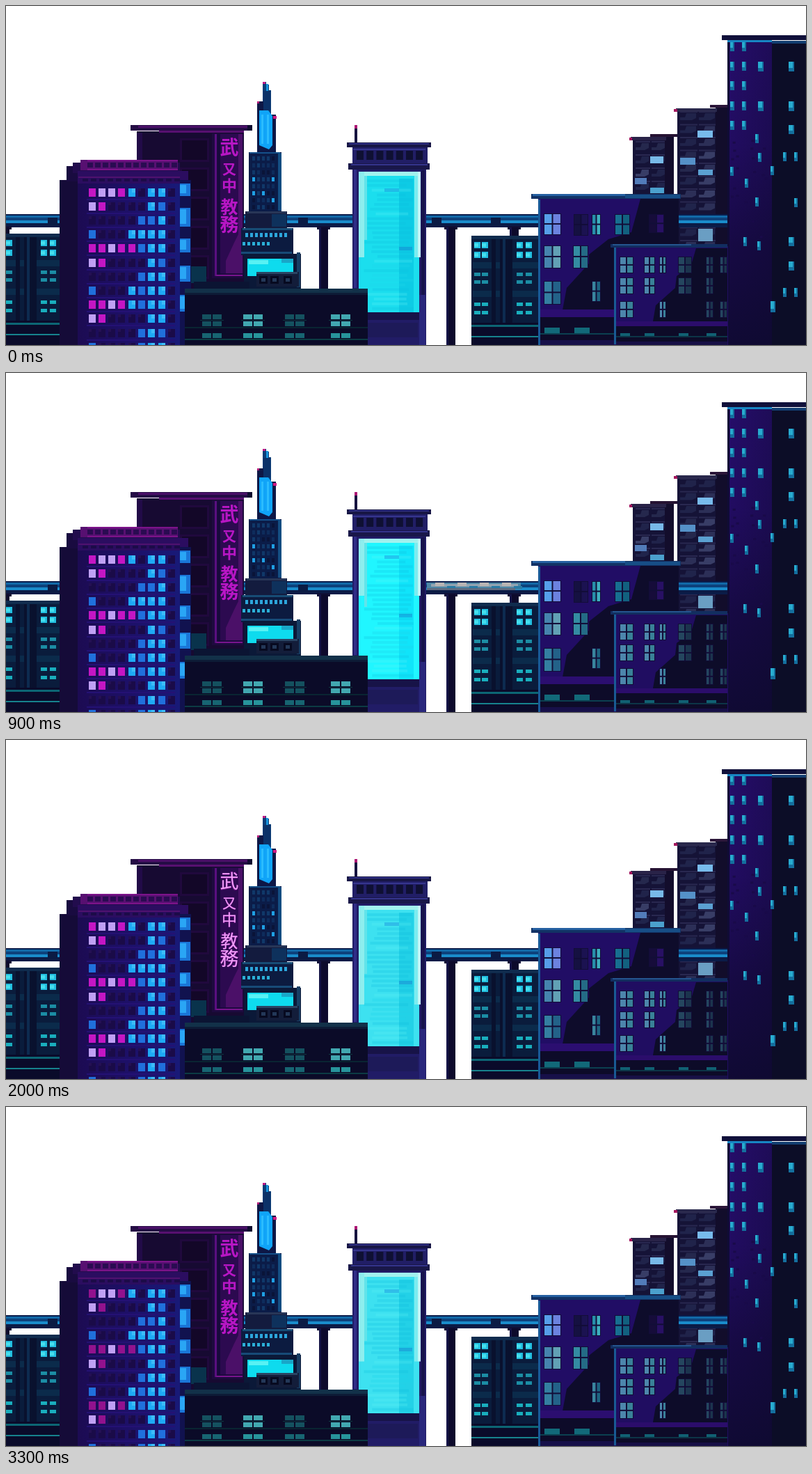
An HTML page with a canvas that plays this animation: 1150x487 px, repeating every 3400 ms.

```html
<!DOCTYPE html>
<html lang="en">
<head>
<meta charset="utf-8">
<title>Night city</title>
<style>
html, body { margin: 0; width: 100%; height: 100%; overflow: hidden; background: #fff }
canvas { display: block }
</style>
</head>
<body>
<canvas id="stage" width="1150" height="487"></canvas>
<script>
const ctx = document.getElementById('stage').getContext('2d');
const LOOP = 3400, STEP = 100;
let seed = 1;
const rnd = () => (seed = seed * 16807 % 2147483647) / 2147483647;
const pick = s => s[Math.floor(rnd() * s.length)];

// Rectangle by its edges
function box(color, x1, y1, x2, y2) {
  ctx.fillStyle = color;
  ctx.fillRect(x1, y1, x2 - x1, y2 - y1);
}
function poly(color, ...p) {
  ctx.fillStyle = color;
  ctx.beginPath();
  for (let i = 0; i < p.length; i += 2) ctx.lineTo(p[i], p[i + 1]);
  ctx.fill();
}
// Same-sized boxes at every crossing of xs and ys
function grid(color, xs, ys, w, h) {
  for (const y of ys) for (const x of xs) box(color, x, y, x + w, y + h);
}
const range = (from, step, n) => Array.from({ length: n }, (_, i) => from + i * step);
function fade(x1, y1, x2, y2, ...colors) {
  const g = ctx.createLinearGradient(x1, y1, x2, y2);
  colors.forEach((c, i) => g.addColorStop(i / (colors.length - 1), c));
  return g;
}

function rail(x1, x2) {
  box('#0a1d4c', x1, 299, x2, 318);
  box('#1269a8', x1, 301, x2, 304);
  box('#0d427c', x1, 304, x2, 308);
  box('#1a8ccb', x1, 308, x2, 312);
  box('#0b1b46', x1, 312, x2, 317);
}

function track() {
  rail(0, 1040);
  grid('#0b1b44', [60, 420, 612, 697], [304], 14, 12);
  for (const [x, bottom] of [[-8, 330], [450, 408], [633, 487], [724, 332]]) {
    box('#101037', x - 3, 316, x + 16, 321);
    box('#0d0a2c', x, 318, x + 13, bottom);
    box('#151446', x, 318, x + 3, bottom);
  }
}

function train(t) {
  const head = .83 * t - 7, tail = head - 135;
  if (t < STEP || tail > 1040) return;
  box('#4d86a5', tail, 301, head, 311);
  box('#93a5b2', tail + 6, 303, head - 4, 307);
  grid('#b9b5b3', range(tail + 12, 32, 4), [301], 13, 5);
  grid('#287ba5', range(tail + 29, 32, 4), [306], 12, 4);
  box('#5f6b80', tail, 309, head - 8, 312);
}

function annex(dx, dy) {
  ctx.save();
  ctx.translate(dx, dy);
  box('#0a1c3c', 669, 330, 766, 490);
  box('#102c4e', 669, 330, 766, 335);
  box('#0b2b4b', 671, 368, 766, 377);
  box('#0b2b4b', 671, 409, 766, 418);
  box('#09112e', 698, 335, 704, 458);
  box('#09112e', 710, 335, 728, 458);
  box('#0d2b50', 714, 335, 718, 458);
  const xs = [673, 684, 734, 747];
  grid('#22bfe0', xs, [339, 353], 9, 9);
  grid('#46dfed', xs, [341, 355], 6, 5);
  grid('#1b8da4', xs, [383, 394], 9, 5);
  grid('#19aebd', xs, [426, 438], 9, 5);
  box('#0a0b2a', 669, 455, 766, 490);
  box('#0c6674', 669, 458, 766, 461);
  box('#16838d', 669, 474, 766, 476);
  ctx.restore();
}

function signTower(bright) {
  box('#170a32', 188, 180, 342, 410);
  box('#220b48', 188, 182, 196, 230);
  grid('#20093d', [250], range(190, 42, 5), 42, 34);
  grid('#130728', [253], range(193, 42, 5), 36, 28);
  box('#250c45', 179, 171, 354, 179);
  box('#4b1168', 190, 172, 352, 175);
  box('#571070', 220, 179, 342, 182);
  box('#0f0a30', 347, 171, 354, 179);
  box('#1e0a3f', 296, 183, 341, 391);
  box('#590f80', 300, 184, 303, 388);
  box('#170a3b', 304, 184, 308, 386);
  box('#2c0a50', 308, 184, 340, 384);
  poly('#4b1068', 334, 184, 340, 184, 340, 384, 316, 384, 316, 366, 328, 340, 334, 328);
  box('#78148d', 302, 386, 340, 388);
  ctx.textAlign = 'center';
  ctx.textBaseline = 'middle';
  const signs = [['武', 203, 27], ['又', 234, 20], ['中', 258, 22], ['教', 288, 25], ['務', 314, 27]];
  const write = (color, weight) => {
    ctx.fillStyle = color;
    for (const [glyph, y, size] of signs) {
      ctx.font = `${weight} ${size}px "Noto Sans CJK JP", "Noto Sans CJK SC", sans-serif`;
      ctx.fillText(glyph, 321, y);
    }
  };
  write(bright ? '#7b138f' : '#b816c5', 'bold');
  if (bright) write('#f0a1f8', 'normal');
}

function leftBlock(lit) {
  box('#150b38', 77, 250, 104, 490);
  box('#190b40', 87, 230, 110, 252);
  box('#220c4d', 96, 225, 250, 240);
  box('#571071', 107, 221, 247, 236);
  box('#7c138a', 117, 221, 247, 223);
  grid('#2a0b51', range(117, 11, 12), [225], 8, 7);
  box('#7c138a', 117, 234, 247, 236);
  box('#2b0d60', 103, 237, 262, 255);
  box('#4f126e', 104, 245, 250, 247);
  grid('#1c0b48', range(110, 12, 12), [248], 8, 4);
  box(fade(103, 0, 252, 0, '#1c0b52', '#1d1068', '#181a78'), 103, 255, 252, 490);
  box('#11124f', 250, 250, 266, 490);
  for (const [y, h] of [[255, 18], [290, 27], [334, 20], [373, 23], [415, 24]]) {
    box('#1a76d8', 250, y, 265, y + h);
    box('#2aa6f5', 250, y + 2, 259, y + h - 4);
  }
  const tones = { M: lit ? '#c416c4' : '#92128e', P: '#c0a0f4', B: '#1eaaf5', b: '#2070dc', d: '#1a0b48' };
  ['MPPMBdBBd', 'PMddddBbd', 'dddddbbBd', 'bdddBBBBd', 'MMPMMbBBd', 'PMddddBbd',
   'dddddbBBd', 'bdddBbBBd', 'MMPMBbBBd', 'PMddddBBd', 'dddddbBbd', 'bddddbBBd'].forEach((row, r) => {
    const y = 262 + r * 20.2 | 0;
    box('#241174', 116, y + 15, 243, y + 17);
    [...row].forEach((c, i) => {
      const x = 119 + i * 14.3 | 0;
      box(tones[c], x, y, x + 10, y + 12);
      if (c == 'B') box('#3dbcf8', x + 5, y, x + 10, y + 6);
      if (c == 'd') box('#241053', x, y, x + 4, y + 4);
    });
  });
}

function spire() {
  poly('#0b3d78', 369, 109, 374, 109, 374, 113, 378, 113, 378, 121, 381, 121, 381, 157, 369, 157);
  box('#1795df', 374, 112, 377, 124);
  box('#c21b86', 369, 109, 373, 112);
  box('#0d1746', 361, 137, 370, 212);
  box('#0d1746', 361, 156, 388, 212);
  box('#0b3168', 370, 122, 380, 150);
  poly('#10a4f8', 364, 150, 377, 150, 383, 158, 383, 200, 378, 206, 364, 200);
  grid('#2bbcff', [367, 375], [156], 3, 42);
  box('#b41b78', 361, 137, 364, 140);
  box('#d01a85', 384, 158, 389, 162);
  box('#0b1c48', 349, 210, 396, 296);
  box('#124d82', 391, 211, 396, 294);
  box('#14508a', 350, 210, 394, 212);
  seed = 24;
  for (const y of range(216, 10, 8)) for (const x of range(354, 7, 5))
    box(pick(['#103869', '#0e2c5c', '#1fa0e4', '#0a1438']), x, y, x + 4, y + 6);
  box('#131b3e', 344, 295, 404, 320);
  box('#283657', 346, 295, 403, 298);
  box('#0e315c', 382, 299, 403, 317);
  box('#0c1b40', 338, 319, 413, 358);
  box('#174c75', 340, 319, 412, 322);
  grid('#2da6dc', range(344, 7, 9), [326], 4, 6);
  grid('#2bb0d8', range(340, 7, 6), [339], 4, 5);
  box('#174b78', 338, 353, 411, 356);
  box('#0b1938', 342, 356, 424, 408);
  box('#183f65', 418, 354, 423, 404);
  box('#0edbee', 347, 363, 413, 388);
  box('#57f1f4', 349, 365, 377, 371);
  box('#19a7c8', 396, 363, 413, 369);
  box('#131d3a', 360, 382, 421, 403);
  box('#2a4564', 360, 382, 419, 385);
  for (const x of [370, 386, 405]) {
    box('#070a20', x - 6, 388, x + 6, 399);
    box('#233858', x - 3, 391, x + 3, 396);
  }
  box('#09334c', 266, 374, 288, 398);
  box('#0b1433', 270, 396, 350, 410);
}

function lowBlock() {
  box('#0b0b28', 257, 406, 520, 490);
  box('#123149', 257, 406, 520, 412);
  box('#0d1c37', 257, 412, 520, 415);
  box('#092532', 257, 461, 520, 463);
  box('#0c3b43', 257, 478, 520, 480);
  [282, 341, 401, 467].forEach((x, i) => {
    const main = i % 2 ? '#42a8b0' : '#14515f', low = i % 2 ? '#27949b' : '#176572';
    grid(main, [x, x + 15], [443, 453], 13, 7);
    grid(low, [x, x + 15], [470], 13, 7);
    box('#0d3940', x - 3, 451, x + 31, 452);
  });
}

function screenTower(t) {
  box('#16133f', 501, 176, 505, 198);
  box('#ad1874', 501, 171, 505, 176);
  box('#211e66', 498, 203, 606, 228);
  box('#171645', 490, 196, 611, 203);
  box('#303084', 493, 197, 608, 199);
  box('#35358d', 499, 205, 603, 207);
  grid('#0f1033', range(504, 14.2, 7), [208], 10, 13);
  box('#191749', 492, 226, 609, 235);
  box('#34348c', 496, 227, 606, 229);
  box('#211c66', 498, 235, 604, 490);
  box('#302d87', 500, 235, 504, 405);
  box('#17134c', 597, 236, 602, 415);
  box('#171348', 520, 440, 594, 451);
  box('#1d1a59', 520, 455, 592, 476);
  box('#29277c', 594, 415, 603, 487);

  const tone = t < 300 ? 0 : t >= 800 && t < 1100 ? 2 : 1;
  box(['#1bdeee', '#3de1f0', '#20f6ff'][tone], 507, 238, 594, 440);
  box(['#0dcbe5', '#23d1e7', '#10e4fa'][tone], 565, 248, 586, 440);
  // Soft scan lines across the screen
  seed = 77;
  for (const y of range(249, 6.8, 28)) {
    const x = 512 + rnd() * 22;
    box(pick(['#0fc0dc48', '#5cf0f440', '#0ab4dc38', '#1ed2e850']), x, y, 586 - rnd() * 12, y + 4);
  }
  box('#168cdc70', 544, 262, 565, 267);
  box('#167fcf75', 565, 346, 584, 351);
  const edge = tone == 2 ? 320 : tone == 0 ? 361 : 368 + 12 * Math.cos(t / 160);
  box('#a2f2ee', 507, 238, 594, 244);
  box('#8deeee', 507, 238, 515, edge);
  box('#62e4ea', 515, 244, 519, 336);
  box('#7cecf0', 587, 244, 592, edge);
  box('#c2f8f6', 592, 238, 596, edge);
}

function flats() {
  // Shared by the two slim towers at the back
  const shade = ['#25284d', '#2c2f57', '#20234a', '#383d66', '#20244b'];
  const tower = (x, top, bottom, w, pitch) => {
    box('#151337', x, top, x + 2 * w + 14, bottom);
    for (let y = top + 7; y < bottom; y += pitch) for (let c = 0; c < 2; c++) {
      const left = x + 4 + c * (w + 2);
      box('#292850', left, y - 3, left + w, y - 1);
      const tone = pick(shade);
      poly(tone, left, y + 10, left, y + 6, left + 7, y + 6, left + 9, y, left + w - 2, y, left + w - 2, y + 7, left + w - 8, y + 10);
    }
  };
  seed = 39;
  tower(901, 190, 272, 21, 19);
  box('#130d2c', 947, 185, 960, 272);
  box('#292348', 898, 188, 949, 193);
  box('#261333', 926, 184, 966, 188);
  box('#a3155f', 896, 189, 900, 193);
  box('#78b9e8', 926, 216, 945, 226);
  box('#527cb9', 904, 247, 921, 256);
  box('#4ba0cd', 926, 261, 946, 269);
  tower(965, 147, 345, 25, 18.5);
  box('#120d2b', 1020, 143, 1038, 345);
  box('#29284c', 963, 147, 1022, 152);
  box('#2b1639', 1012, 142, 1037, 146);
  box('#a5185e', 960, 148, 965, 152);
  box('#78bbec', 994, 179, 1016, 189);
  box('#5591c8', 969, 218, 991, 228);
  box('#5ba1d2', 995, 235, 1016, 243);
  box('#6a9ec3', 995, 320, 1016, 338);
  rail(967, 1038);
}

function highRise() {
  box(fade(0, 50, 0, 487, '#260d6b', '#220c62', '#170a45', '#100a34'), 1037, 50, 1102, 490);
  box(fade(1037, 0, 1102, 0, '#0d0a2c00', '#0d0a2c50'), 1037, 52, 1102, 490);
  box('#0c0d27', 1101, 50, 1150, 490);
  box('#100c36', 1037, 50, 1040, 490);
  box('#10103a', 1029, 42, 1150, 49);
  box('#1786c4', 1037, 49, 1101, 52);
  box('#123d70', 1101, 50, 1150, 54);
  const pane = (x, y, w = 5, h = 13) => {
    box('#146f9e', x, y, x + w, y + h);
    box('#28acd0', x, y, x + w - 2, y + h - 5);
  };
  for (const y of [52, 80, 108, 137, 165]) [1041, 1058].forEach(x => pane(x, y, 6));
  for (const y of [80, 137]) [1081, 1125].forEach(x => pane(x, y, 8, 14));
  for (const y of [171, 332, 367]) pane(1125, y, 8);
  for (const y of [210, 405]) [1117, 1133].forEach(x => pane(x, y));
  pane(1133, 276);
  for (const [x, y] of [[1077, 184], [1081, 211], [1041, 231], [1099, 230], [1062, 248], [1077, 275], [1060, 332], [1080, 338]])
    pane(x, y);
  pane(1099, 424, 7, 16);
  seed = 12;
  for (let i = 0; i < 20; i++) {
    const x = 1042 + rnd() * 50, y = 180 + rnd() * 160;
    box('#190a49', x, y, x + 4, y + 3);
  }
}

// Window of two by two panes, shaded towards the right
function sash(x, y, w, h, light, dark) {
  const mid = y + h * .45;
  box('#120d38', x - 1, y - 1, x + w + 1, y + h + 1);
  box(light, x, y, x + w / 2 - 1, mid);
  box(dark, x + w / 2 + 1, y, x + w, mid);
  box(light, x, mid + 2, x + w / 2 - 1, y + h);
  box(dark, x + w / 2 + 1, mid + 2, x + w, y + h);
}

function rightBlocks() {
  box('#210d65', 765, 276, 967, 490);
  poly('#0e0c2b', 912, 277, 967, 277, 967, 437, 800, 437, 806, 405, 838, 370, 838, 357, 866, 335, 899, 325);
  box('#123265', 755, 270, 970, 277);
  box('#2560a1', 757, 270, 890, 273);
  box('#174e86', 890, 271, 969, 276);
  box('#195a98', 765, 278, 768, 487);
  sash(774, 299, 23, 29, '#569eea', '#6c82df');
  sash(817, 300, 19, 29, '#151141', '#1b1251');
  sash(843, 300, 11, 28, '#278eaa', '#3eb0bf');
  sash(876, 300, 20, 28, '#176f91', '#12617f');
  sash(925, 300, 20, 25, '#160c3a', '#281064');
  sash(774, 345, 23, 31, '#4684ae', '#62a1b5');
  sash(816, 345, 20, 31, '#348ca2', '#246b86');
  sash(774, 396, 23, 32, '#347fa1', '#236289');
  sash(843, 396, 11, 28, '#39859d', '#1d6480');
  box('#2b0e70', 768, 436, 876, 447);
  box('#0d0b29', 768, 447, 876, 490);
  box('#0b4050', 768, 470, 876, 472);
  grid('#126979', [774, 817], [462], 22, 8);
  box('#171049', 768, 480, 876, 487);

  box('#200d61', 874, 345, 1038, 490);
  poly('#0d0c29', 992, 348, 1037, 348, 1037, 453, 930, 453, 934, 430, 962, 405, 964, 388, 985, 372);
  box('#122e60', 869, 342, 1037, 347);
  box('#24558f', 872, 342, 985, 344);
  box('#195a94', 874, 347, 877, 486);
  const rows = [
    [361, [883, 18], [918, 14], [940, 8], [967, 18], [1007, 9], [1027, 9]],
    [391, [883, 18], [918, 14], [967, 18], [1007, 9]],
    [425, [883, 18], [940, 8], [1007, 9], [1027, 9]]
  ];
  for (const [y, ...panes] of rows) for (const [x, w] of panes)
    sash(x, y, w, 22, x > 960 ? '#24465f' : '#4d86ac', x > 960 ? '#1b344d' : '#398198');
  box('#2b0d6b', 877, 453, 1037, 460);
  box('#0d0b28', 877, 460, 1037, 490);
  box('#0c3547', 877, 474, 1037, 476);
  grid('#116173', [883, 918, 967, 1007], [470], 14, 4);
  box('#171046', 877, 482, 1037, 487);
}

const within = (t, from, to) => t >= from && t < to;

function draw(now) {
  const t = Math.floor(now % LOOP / STEP) * STEP;
  const signOn = within(t, 500, 800) || within(t, 1900, 2700);
  const windowsOn = t < 2300 && (t % 1000 < 300 || t % 1000 >= 800);
  box('#fff', 0, 0, 1150, 487);
  track();
  train(t);
  annex(0, 0);
  annex(-684, -3);
  signTower(signOn);
  spire();
  screenTower(t);
  leftBlock(windowsOn);
  lowBlock();
  flats();
  highRise();
  rightBlocks();
}

const start = performance.now();
function frame() {
  draw(performance.now() - start);
  requestAnimationFrame(frame);
}
frame();
</script>
</body>
</html>
```
